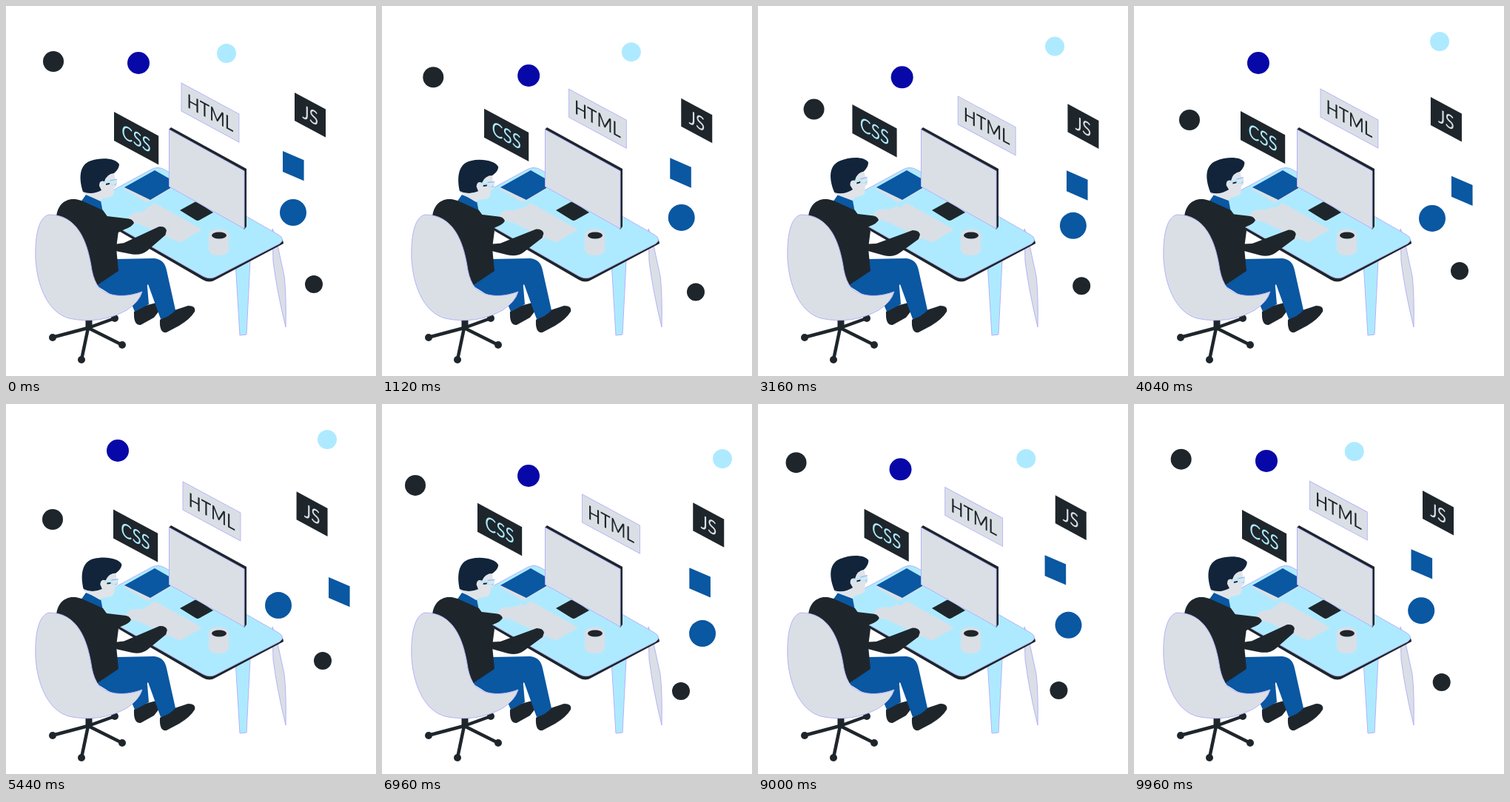
Animation, 500 px wide and 500 px high, one loop 10000 ms. Source, as an HTML page:

```html
<!DOCTYPE html>
<html lang="en">
<head>
<meta charset="utf-8">
<title>Developer at a desk</title>
<style>
  html, body { margin: 0; width: 100%; height: 100%; overflow: hidden; background: #fff; }
  svg { display: block; width: 100vw; height: 100vh; }
  text { font: 26px Lato, sans-serif; text-anchor: middle; }
  .dark { fill: #1e262c; }
  .blue { fill: #0a57a2; }
  .sky { fill: #aeeaff; }
  .grey { fill: #dadfe6; }
  .skin { fill: #e0e4e9; }
  .hair { fill: #12243a; }
  .rim { stroke: #b4b2fa; stroke-width: 1; }
</style>
</head>
<body>
<svg viewBox="0 0 500 500">
  <!-- table -->
  <path class="grey rim" d="M360 301L365 314L376 365Q379 390 378 434Q366 385 361 345Z"/>
  <path class="sky rim" d="M310 346L330 344L325 444L316 445Z"/>
  <path class="dark" d="M128 264L369 313Q375 315 375 321L283 370Q275 375 266 370L130 291Z"/>
  <path class="sky rim" d="M128 258L196 221Q205 216 214 221L368 309Q378 315 370 321L283 366Q275 370 266 365L130 287Q112 272 128 258Z"/>
  <path class="grey" d="M159 247L201 224L222 235V248L190 266Z"/>
  <path class="blue" d="M160 245L201 222L222 234V246L195 262Z"/>
  <path class="dark" d="M235 276L255 265Q257 264 259 265L280 279L262 289Q259 291 256 289Z"/>
  <path class="grey" d="M169 289L198 268Q201 266 204 268L265 302L238 318Q235 320 231 318L205 306Z"/>
  <path class="grey" d="M274 309V329C274 340 301 340 301 329V309C300 299 275 299 274 309Z"/>
  <ellipse class="dark" cx="288" cy="310" rx="10" ry="4.5"/>
  <!-- monitor -->
  <path class="dark" d="M220 167L223 164L325 220V298L322 302Z"/>
  <path class="grey rim" d="M220.500 167L322 223V301L220.500 244Z"/>

  <!-- legs -->
  <path class="dark" d="M173 413L188 405L203 401Q209 404 207 412L200 421L182 431Q172 432 173 413Z"/>
  <path class="dark" d="M208 424L228 411L246 405Q257 405 255 413Q249 423 234 432L217 441Q207 443 208 424Z"/>
  <path class="blue" d="M158 375L190 368L193 403L174 413Z"/>
  <path class="blue" d="M121 377L150 342L200 341Q214 342 217 357L229 411Q221 420 209 423L192 376L180 389L150 395Z"/>
  <!-- chair -->
  <g fill="none" stroke="#1e262c" stroke-width="4.500" stroke-linecap="round">
    <path d="M111 435L62 448M111 435L147 422M111 435L157 458M111 435L102 478"/>
    <path d="M112 422V437" stroke-width="9" stroke-linecap="butt"/>
  </g>
  <g class="dark">
    <circle cx="63" cy="448" r="5"/><circle cx="147" cy="422" r="5"/>
    <circle cx="157" cy="458" r="5"/><circle cx="102" cy="478" r="5"/>
  </g>
  <!-- person -->
  <g id="left">
    <path class="grey" d="M155 287C155 277 164 273 176 275L190 270V286L172 291Z"/>
    <path class="dark" d="M118 279L152 283Q161 283 163 289Q161 294 150 298L130 308Z"/>
  </g>
  <path class="blue" d="M101 265L108 255L128 263L131 279L110 275Z"/>
  <g id="head">
    <path class="skin" d="M112 235L146 226L148 237L150 243L146 246L145 255Q143 259 131 260L128 264L104 253Z"/>
    <path class="hair" d="M104 251C98 232 99 214 115 209C130 204 149 206 153 214Q153 220 146 226Q136 227 133 237Q126 235 126 243L129 249Q116 256 104 251Z"/>
    <path d="M130 239L140 237M140 235H149V239Q145 244 141 240Z" fill="none" stroke="#aeeaff" stroke-width="1.500"/>
    <path d="M141 236L150 234M149 240L147 242" fill="none" stroke="#8280e8" stroke-width=".6"/>
    <path class="hair" d="M135 240L140 239V241L135 242Z"/>
  </g>
  <path class="dark" d="M68 286C69 268 82 256 102 263L131 276L141 290L152 304L149 327L152 358L122 378L108 365L90 295Z"/>
  <g id="right">
    <path class="grey" d="M205 308L215 301L230 309L214 318Z"/>
    <path class="dark" d="M140 322L160 321L209 303Q218 303 219 309L217 315L191 334Q182 340 170 337L145 330Z"/>
  </g>
  <path class="grey rim" d="M58 282C43 286 39 313 40 343C43 385 60 415 85 422C113 428 140 424 163 411Q180 400 184 386C163 394 140 394 126 381Q119 372 116 357C110 315 95 282 58 282Z"/>
  <g id="floats"></g>
</svg>
<script>
const LOOP = 10000;
const NS = "http://www.w3.org/2000/svg";
const $ = id => document.getElementById(id);

function add(parent, tag, attrs, content) {
  const el = document.createElementNS(NS, tag);
  for (const k in attrs) el.setAttribute(k, attrs[k]);
  if (content) el.textContent = content;
  return parent.appendChild(el);
}

// Smooth periodic curve through keys [time, value, ...]
function curve(keys, t, period, dim = 1) {
  const n = keys.length;
  const key = i => {
    const turn = Math.floor(i / n), k = keys[i - turn * n];
    return [k[0] + turn * period, k[dim]];
  };
  t %= period;
  let i = n - 1;
  while (i > 0 && keys[i][0] > t) i--;
  const [a, b, c, d] = [-1, 0, 1, 2].map(o => key(i + o));
  const h = c[0] - b[0], u = (t - b[0]) / h;
  const m0 = (c[1] - a[1]) / (c[0] - a[0]) * h;
  const m1 = (d[1] - b[1]) / (d[0] - b[0]) * h;
  const u2 = u * u, u3 = u2 * u;
  return (2 * u3 - 3 * u2 + 1) * b[1] + (u3 - 2 * u2 + u) * m0
    + (3 * u2 - 2 * u3) * c[1] + (u3 - u2) * m1;
}

const wave = t => (1 - Math.cos(2 * Math.PI * t / 5000)) / 2;
const swing = keys => t => curve(keys, t, 5000);

const htmlX = swing([[0, 0], [440, 2], [1960, 33.5], [2240, 38.5], [3040, 35], [4040, 15]]);
const cssX = swing([[0, 0], [440, -1], [1960, -17], [2240, -18], [3040, -20], [4040, -2]]);
const tilt = swing([[0, 0], [440, 4], [1960, 5], [2240, 3], [3040, -4], [4040, -4]]);
const reach = swing([[0, 1], [440, .6], [1960, 0], [2240, 0], [3040, 0], [4040, .1]]);

// Tilted plates sliding along their own slope
const plates = [
  { x: 237, y: 104, w: 90, h: 38, cls: "grey rim", label: "HTML", ink: "#1e262c", move: htmlX },
  { x: 146, y: 143, w: 69.5, h: 39, cls: "dark", label: "CSS", ink: "#aeeaff", move: cssX },
  { x: 390, y: 117, w: 48.5, h: 38, cls: "dark", label: "JS", ink: "#dadfe6", move: t => 34 * wave(t) },
  { x: 374, y: 196, w: 33, h: 28, cls: "blue", slope: .43, rise: .613,
    move: t => 68 * (1 - Math.abs(t / 5000 - 1)) }
];
for (const p of plates) {
  p.el = add($("floats"), "g", {});
  add(p.el, "rect", { width: p.w, height: p.h, class: p.cls });
  if (p.label) add(p.el, "text", { x: p.w / 2, y: p.h / 2 + 9.5, fill: p.ink }, p.label);
}

// Drifting discs: [time, x, y]
const discs = [
  { r: 14, fill: "#1e262c", path: [[0, 64, 75], [1060, 69, 95], [2240, 74, 121], [4040, 75, 154],
    [5200, 66, 158], [5440, 63, 156], [6240, 53, 133], [6960, 45, 110], [8040, 43, 87], [9400, 56, 77]] },
  { r: 15, fill: "#0808a8", path: [[0, 179, 77], [2240, 215, 110], [4040, 168, 77], [5440, 151, 63],
    [6960, 198, 97], [8040, 209, 103]] },
  { r: 13, fill: "#aeeaff", path: [[0, 298, 64], [2240, 383, 60], [4040, 413, 48], [4700, 423, 42],
    [5440, 434, 48], [6960, 460, 74], [7240, 462, 79], [8040, 423, 83], [9360, 339, 70]] },
  { r: 18, fill: "#0a57a2", path: [[0, 388, 279], [2240, 434, 300], [2600, 438, 302], [4040, 403, 287],
    [5440, 368, 272], [6960, 433, 310], [7700, 461, 324], [8040, 454, 322], [8360, 447, 316]] },
  { r: 12, fill: "#1e262c", path: [[0, 416, 376], [2240, 431, 395], [4040, 440, 358], [5440, 428, 347],
    [6960, 404, 388], [8040, 399, 399]] }
];
for (const d of discs) d.el = add($("floats"), "circle", { r: d.r, fill: d.fill });

function draw(t) {
  for (const p of plates) {
    const dx = p.move(t), slope = p.slope || .538, rise = p.rise || .538;
    p.el.setAttribute("transform",
      `matrix(.866 ${.866 * slope} 0 1 ${p.x + dx} ${p.y + dx * rise})`);
  }
  for (const d of discs) {
    d.el.setAttribute("cx", curve(d.path, t, LOOP, 1));
    d.el.setAttribute("cy", curve(d.path, t, LOOP, 2));
  }
  const r = reach(t);
  $("head").setAttribute("transform", `rotate(${tilt(t) * 1.1} 116 260)`);
  $("left").setAttribute("transform", `translate(${r * 10} ${r * 4})`);
  $("right").setAttribute("transform", `rotate(${-r * 5} 152 330)`);
}

const start = performance.now();
function tick() {
  draw((performance.now() - start) % LOOP);
  requestAnimationFrame(tick);
}
draw(0);
requestAnimationFrame(tick);
</script>
</body>
</html>
```
